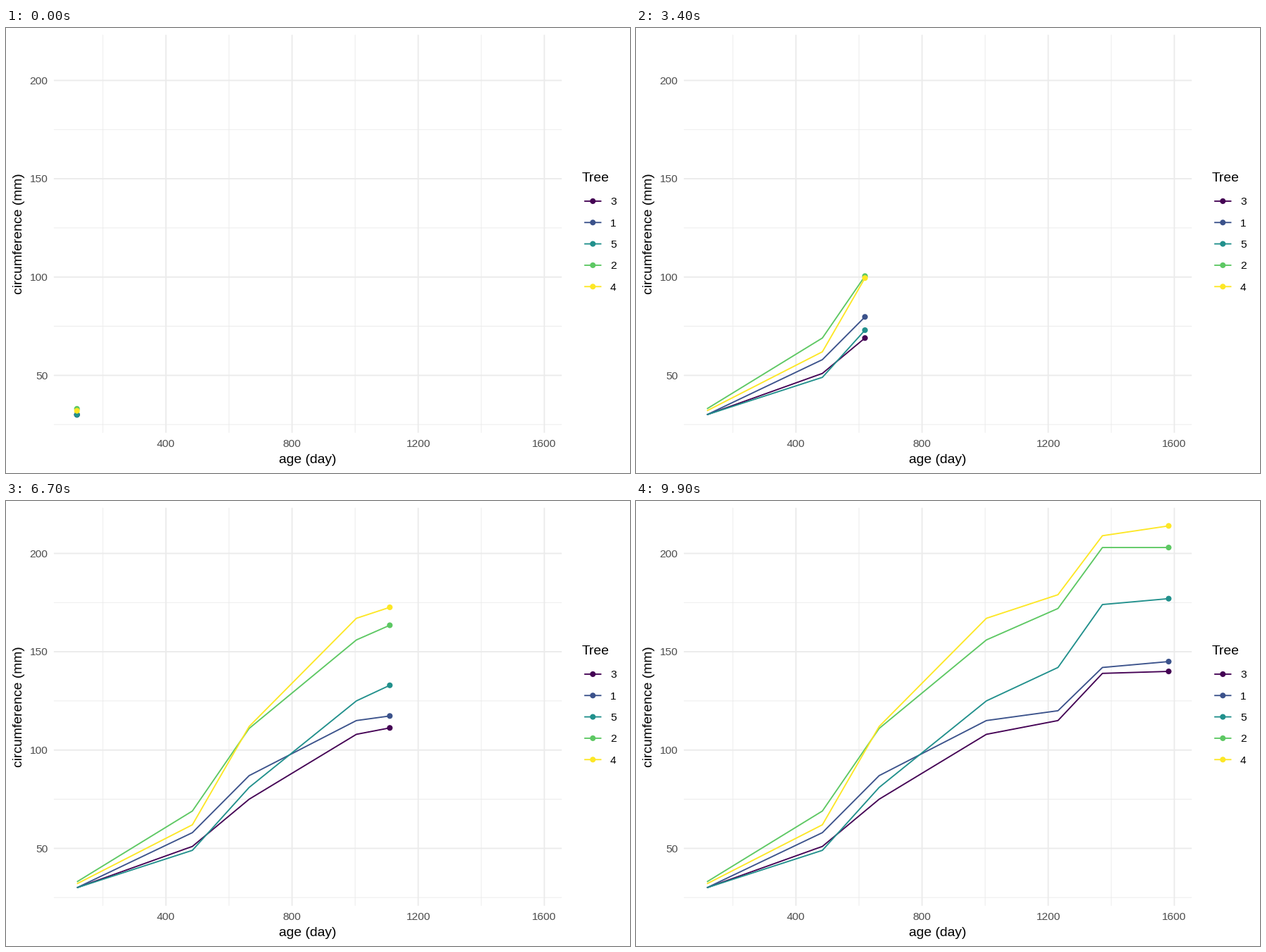
These frames come from a looping animation (885x632 px, 10 s). A matplotlib script:

```python
import numpy as np
import matplotlib.pyplot as plt
from matplotlib.animation import FuncAnimation
from matplotlib.patches import Circle

W, H, DPI = 885, 632, 64
PT = 72 / DPI  # points per pixel
FRAMES = 100
LEFT, RIGHT, TOP, BOTTOM = 67.9, 788.2, 9.66, 574.9
TITLE, LABEL = 19.31, 15.45
LINE, RADIUS = 1.87, 4.05
KEY_X, KEY_Y, KEY_STEP = 832.3, 245.9, 30.34

AGE = np.array([118, 484, 664, 1004, 1231, 1372, 1582])
TREES = {
    "3": ("#440154", [30, 51, 75, 108, 115, 139, 140]),
    "1": ("#3B528B", [30, 58, 87, 115, 120, 142, 145]),
    "5": ("#21908C", [30, 49, 81, 125, 142, 174, 177]),
    "2": ("#5DC863", [33, 69, 111, 156, 172, 203, 203]),
    "4": ("#FDE725", [32, 62, 112, 167, 179, 209, 214]),
}
# Each measurement falls on a whole frame; motion is linear in between.
STOPS = np.rint((FRAMES - 1) * (AGE - AGE[0]) / (AGE[-1] - AGE[0]))

plt.rcParams["font.family"] = "Liberation Sans"

fig = plt.figure(figsize=(W / DPI, H / DPI), dpi=DPI, facecolor="white")
ax = fig.add_axes([0, 0, 1, 1])
ax.set_xlim(0, W)
ax.set_ylim(H, 0)
ax.axis("off")


def px(age):
    return LEFT + (np.asarray(age) - 44.8) / 1610.4 * (RIGHT - LEFT)


def py(size):
    return BOTTOM - (np.asarray(size) - 20.8) / 202.4 * (BOTTOM - TOP)


def stroke(x, y, color, width, z):
    line, = ax.plot(x, y, color=color, lw=width * PT, zorder=z, snap=False,
                    solid_capstyle="butt", solid_joinstyle="round")
    return line


def dot(x, y, color):
    return ax.add_patch(Circle((x, y), RADIUS, fc=color, lw=0, zorder=4))


def label(x, y, text, size, color="black", ha="center", **kw):
    ax.text(x, y, text, fontsize=size * PT, color=color, ha=ha,
            va="baseline", **kw)


def grid(ages, sizes, width, z):
    for a in ages:
        stroke([px(a)] * 2, [TOP, BOTTOM], "#EBEBEB", width, z)
    for s in sizes:
        stroke([LEFT, RIGHT], [py(s)] * 2, "#EBEBEB", width, z)


grid(range(200, 1401, 400), range(25, 176, 50), LINE / 2, 1)
grid(range(400, 1601, 400), range(50, 201, 50), LINE, 2)

for a in range(400, 1601, 400):
    label(px(a), 594.6, str(a), LABEL, "#4D4D4D")
for s in range(50, 201, 50):
    label(59.2, py(s) + 5.4, str(s), LABEL, "#4D4D4D", "right")

label((LEFT + RIGHT) / 2, 617.6, "age (day)", TITLE)
label(23.4, (TOP + BOTTOM) / 2, "circumference (mm)", TITLE,
      rotation=90, rotation_mode="anchor")
label(817.1, 218.3, "Tree", TITLE, ha="left")

lines, dots = [], []
for i, (name, (color, sizes)) in enumerate(TREES.items()):
    y = KEY_Y + i * KEY_STEP
    stroke([KEY_X - 12.14, KEY_X + 12.14], [y, y], color, LINE, 3)
    dot(KEY_X, y, color)
    label(857.1, y + 5.4, name, LABEL, ha="left")
    lines.append(stroke([], [], color, LINE, 3))
    dots.append(dot(px(AGE[0]), py(sizes[0]), color))


def draw(k):
    past = STOPS < k
    x = px(np.append(AGE[past], np.interp(k, STOPS, AGE)))
    for line, point, (_, sizes) in zip(lines, dots, TREES.values()):
        sizes = np.array(sizes)
        y = py(np.append(sizes[past], np.interp(k, STOPS, sizes)))
        line.set_data(x, y)
        point.set_center((x[-1], y[-1]))
    return lines + dots


anim = FuncAnimation(fig, draw, frames=FRAMES, interval=100, repeat=True,
                     repeat_delay=0)
plt.show()
```
